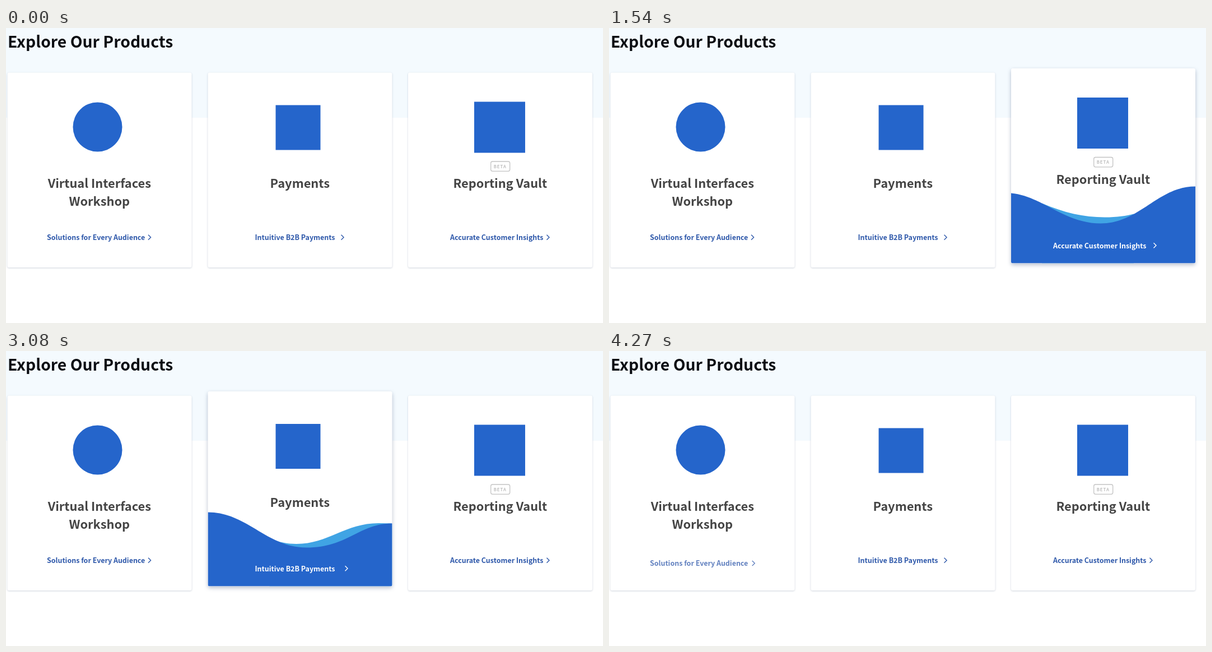
These frames come from a looping animation (1066 by 526 pixels, 4.34 s). An HTML page:

```html
<!DOCTYPE html>
<html lang="en">
<head>
<meta charset="utf-8">
<title>Explore Our Products</title>
<style>
  html, body { margin: 0; width: 100%; height: 100%; overflow: hidden; background: #fff; }
  svg { display: block; width: 1066px; height: 526px; }
  text { font-family: "Noto Sans CJK JP", "Noto Sans CJK SC", "Noto Sans", sans-serif; font-weight: 600; }
  .heading { font-size: 28.3px; fill: #0b0d12; }
  .name { font-size: 21.8px; fill: #444; text-anchor: middle; }
  .link { font-size: 12.45px; }
  .beta { font-size: 7.6px; letter-spacing: 1px; fill: #bdbdbd; }
  .chevron { fill: none; stroke-width: 1.4; }
</style>
</head>
<body>
<svg viewBox="0 0 1066 526">
  <clipPath id="face"><rect width="329" height="347.5" rx="3"/></clipPath>
  <rect width="1066" height="526" fill="#fff"/>
  <rect width="1066" height="160" fill="#f4fafe"/>
  <text class="heading" x="3" y="34.5">Explore Our Products</text>
  <g id="cards"></g>
</svg>
<script>
const LOOP = 4340, STEP = 70;
const CARD_TOP = 79.5, CARD_HEIGHT = 347.5;
const BLUE = '#2565cb', SKY = '#40a4e4';

// Wave outlines are measured upwards from the card's bottom edge.
const cards = [
  {
    x: 2.5, enter: 3115, leave: 3998,
    name: ['Virtual Interfaces', 'Workshop'],
    link: 'Solutions for Every Audience', linkX: 70.5, chevronX: 251.5,
    icon: `<circle cx="161" cy="97" r="44" fill="${BLUE}"/>`,
    back: 'M55 0V101C95 80 125 67.5 166 67.5C225 67.5 235 106 300 124L329 137V0Z',
    front: 'M0 0V114C60 110 95 61.5 177 61.5C245 61.5 255 125 329 137V0Z'
  },
  {
    x: 360.5, enter: 1945, leave: 3103,
    name: ['Payments'],
    link: 'Intuitive B2B Payments', linkX: 84, chevronX: 238,
    icon: `<rect x="121" y="58" width="80" height="80" fill="${BLUE}"/>`,
    back: 'M110 0V86C125 79 140 75.5 158 75.5C215 75.5 245 112.5 305 112.5L329 112V0Z',
    front: 'M0 0V132C70 132 105 69 176 69C250 69 270 112 329 112V0Z'
  },
  {
    x: 718, enter: 778, leave: 1945,
    name: ['Reporting Vault'],
    link: 'Accurate Customer Insights', linkX: 75, chevronX: 247.5,
    icon: `<rect x="118" y="52" width="91" height="91" fill="${BLUE}"/>`,
    badge: `<rect x="147.7" y="158.5" width="34" height="17.3" rx="3" fill="none" stroke="#c4c4c4" stroke-width="1.3"/>
            <text class="beta" x="152.7" y="170">BETA</text>`,
    back: 'M55 0V107C95 90 130 82 167 82C190 82 205 84.5 219 88V0Z',
    front: 'M0 0V125C55 120 95 71 160 71C230 71 262 137 329 137V0Z'
  }
];

const layer = document.getElementById('cards');
for (const card of cards) {
  const group = document.createElementNS('http://www.w3.org/2000/svg', 'g');
  const name = card.name.map((line, i) =>
    `<text class="name" x="164.3" y="${205.5 + i * 31.7}">${line}</text>`).join('');
  group.innerHTML = `
    <rect class="panel" width="329" height="${CARD_HEIGHT}" rx="3" fill="#fff"/>
    ${card.icon}${card.badge || ''}${name}
    <g clip-path="url(#face)"><g class="wave">
      <path d="${card.back}" fill="${SKY}"/><path d="${card.front}" fill="${BLUE}"/>
    </g></g>
    <g class="action">
      <text class="link" x="${card.linkX}" y="298.5">${card.link}</text>
      <path class="chevron" d="M0 -4.5L4.5 0L0 4.5"/>
    </g>`;
  layer.append(group);
  const find = part => group.querySelector('.' + part);
  Object.assign(card, {
    group, panel: find('panel'), wave: find('wave'), action: find('action'),
    label: find('link'), chevron: find('chevron')
  });
}

const clamp = v => Math.min(1, Math.max(0, v));
const easeInOut = v => { const u = clamp(v); return u * u * (3 - 2 * u); };
const easeOut = v => Math.sqrt(clamp(v));
const mixToWhite = (rgb, p) => `rgb(${rgb.map(v => Math.round(v + (255 - v) * p))})`;

function drawCard(card, time) {
  const since = time - card.enter, after = time - card.leave;
  const hover = duration => easeInOut(since / duration) - easeInOut(after / duration);
  const lift = hover(250), slide = hover(400);
  const leaving = after > 0;
  const rise = leaving ? 1 - easeInOut(after / 290) : easeOut(since / 390);
  const sink = (leaving ? 20 : 10) * (1 - rise);

  card.group.setAttribute('transform', `translate(${card.x} ${CARD_TOP - 7.5 * lift})`);
  card.panel.style.filter =
    `drop-shadow(0 ${1 + 2.5 * lift}px ${1.8 + 2 * lift}px rgba(50,70,110,${0.24 + 0.1 * lift}))`;
  card.wave.setAttribute('transform', `translate(0 ${CARD_HEIGHT + sink}) scale(1 ${-rise})`);
  card.wave.style.display = rise > 0 ? '' : 'none';

  const color = mixToWhite([46, 88, 170], slide);
  card.action.setAttribute('transform', `translate(0 ${22 * slide})`);
  card.label.setAttribute('fill', color);
  card.chevron.setAttribute('stroke', color);
  card.chevron.setAttribute('transform', `translate(${card.chevronX + 7 * slide} 293.7)`);
}

function draw() {
  const time = Math.floor(performance.now() % LOOP / STEP) * STEP;
  cards.forEach(card => drawCard(card, time));
  requestAnimationFrame(draw);
}
draw();
</script>
</body>
</html>
```
